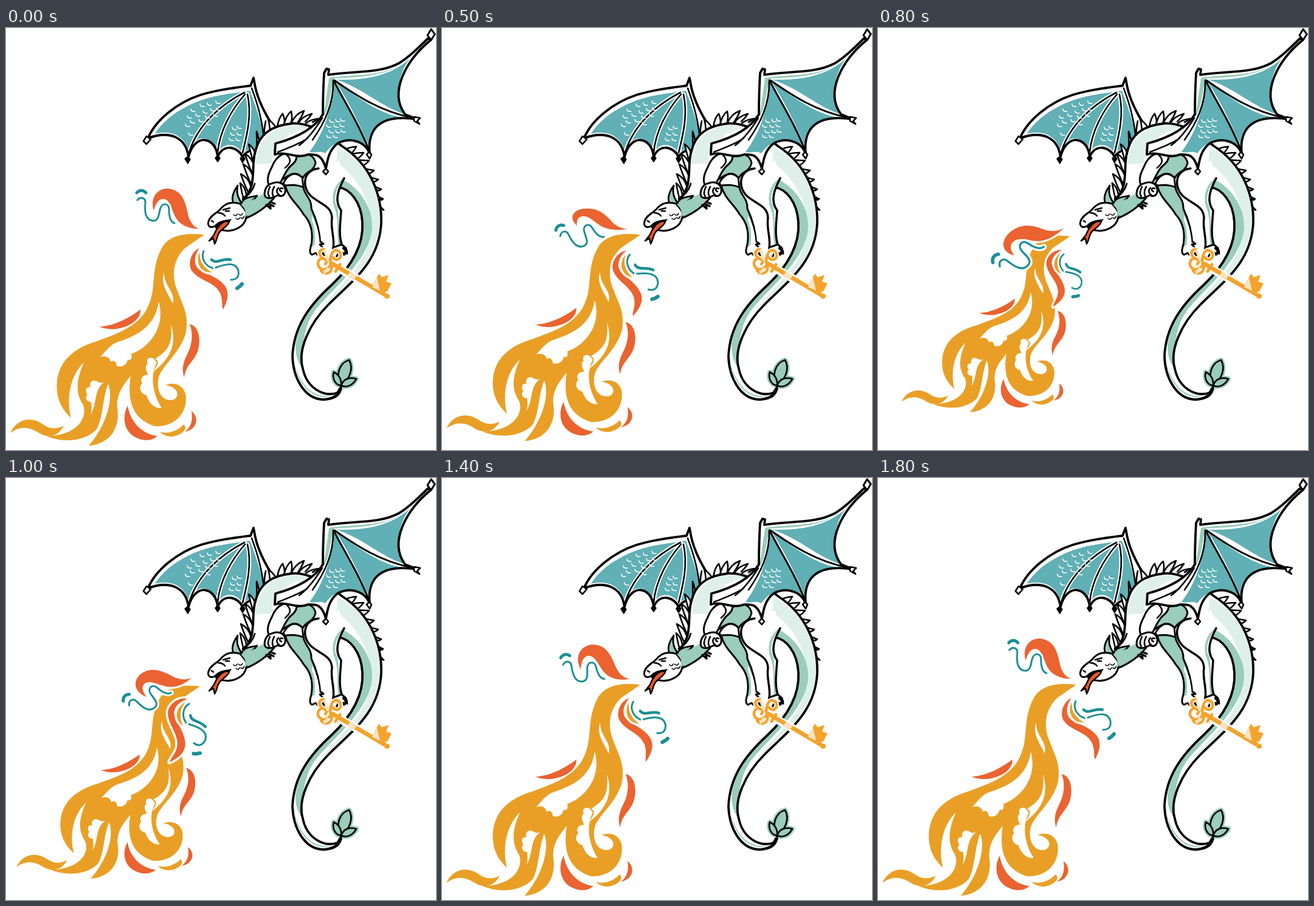
Recreate the animation shown at these times as an HTML page with a canvas. Size 707 by 694 pixels, loop 2 s.

```html
<!DOCTYPE html>
<html lang="en">
<head>
<meta charset="utf-8">
<title>Dragon breathing fire</title>
<style>
html, body { margin: 0; width: 100%; height: 100%; overflow: hidden; background: #fff; }
canvas { display: block; }
</style>
</head>
<body>
<canvas id="stage" width="707" height="694"></canvas>
<script>
const ctx = document.getElementById('stage').getContext('2d');
const BLACK = '#000', WHITE = '#fff', TEAL = '#60b0b5', MINT = '#9acdbb', PALE = '#dff0ea';
const YELLOW = '#e99f25', RED = '#ea6330', CURL = '#1b8f95', GOLD = '#f4a32c', CREAM = '#fae3c3';
ctx.lineJoin = ctx.lineCap = 'round';

function fill(d, color) {
  ctx.fillStyle = color;
  ctx.fill(new Path2D(d));
}
function line(d, width = 3, color = BLACK) {
  ctx.lineWidth = width;
  ctx.strokeStyle = color;
  ctx.stroke(new Path2D(d));
}
function shape(d, color = WHITE, width = 3) {
  fill(d, color);
  line(d, width);
}
// White margin keeps overlapping pieces apart
function haloFill(d, color) {
  line(d, 7, WHITE);
  fill(d, color);
}
function haloLine(d, width) {
  line(d, width + 6, WHITE);
  line(d, width, CURL);
}
function placed(matrix, draw) {
  ctx.save();
  ctx.transform(...matrix);
  draw();
  ctx.restore();
}
function spike(x, y, tipX, tipY, dx, dy) {
  shape(`M${x},${y} Q${x + (tipX - x) * .25},${y + (tipY - y) * .7} ${tipX},${tipY}
    Q${x + dx + (tipX - x) * .3},${y + dy + (tipY - y) * .4} ${x + dx},${y + dy}`, WHITE, 2.6);
}
function scales(points) {
  for (const [x, y] of points) line(`M${x - 3},${y - 2} q0,5 7,4`, 1.5, WHITE);
}

function flame() {
  fill(`M326,340 C296,336 268,340 256,362 C238,395 247,425 236,452 C222,492 180,503 150,515
    C105,528 80,555 84,598 C86,618 97,632 107,641 C99,610 105,572 128,550
    C115,580 114,600 127,620 C135,645 112,671 66,671 C95,683 130,680 149,660
    C160,640 158,612 168,585 C178,610 164,655 136,687 C173,684 188,655 183,625
    C181,600 195,585 205,572 L262,540 L268,380Z`, YELLOW);
  fill(`M205,572 C200,605 203,642 245,655 C285,656 300,625 295,601 C290,586 277,582 262,587
    C282,590 287,605 276,611 C258,616 246,598 251,575 C256,555 287,535 296,500
    C301,470 290,455 283,435 C268,400 275,365 326,340 L262,362 L236,470Z`, YELLOW);
  // Gaps inside the fire
  fill(`M251,450 C246,490 216,506 185,516 C171,520 164,532 155,541 C166,538 171,543 172,549
    C178,545 182,550 182,556 C192,559 199,553 200,545 C205,548 208,543 206,536
    C231,528 264,495 251,450Z`, WHITE);
  fill('M260,402 C253,421 267,437 274,453 C280,435 259,424 260,402Z', WHITE);
  fill('M271,487 C275,520 265,532 245,544 C255,549 247,556 243,565 C270,543 282,520 271,487Z', WHITE);
  fill(`M242,543 C234,540 230,546 233,552 C227,556 231,565 234,570 C223,570 220,579 224,584
    C217,592 222,602 231,604 C235,618 245,626 256,625 C242,603 236,574 248,550Z`, WHITE);
  fill(`M162,582 C153,587 150,578 143,580 C137,582 138,589 139,591 C130,589 130,598 134,603
    C128,609 134,615 140,615 C141,624 141,630 139,636 C151,617 143,596 162,582Z`, WHITE);
  // Loose pieces around it
  fill('M7,666 C18,642 42,638 61,652 C74,661 86,659 95,654 C85,674 66,675 51,664 C36,655 22,655 7,666Z', YELLOW);
  fill('M253,664 C268,669 284,661 292,652 C302,660 284,672 271,672 C262,671 256,668 253,664Z', YELLOW);
  fill('M305,630 C318,640 315,660 294,664 C306,655 307,643 305,630Z', RED);
  fill('M200,621 C190,640 194,665 215,674 C228,680 240,679 249,671 C225,668 205,650 200,621Z', RED);
  fill('M154,491 C180,490 205,475 221,463 C222,478 206,489 190,493 C176,497 162,495 154,491Z', RED);
  fill('M302,487 C318,490 321,515 315,532 C308,550 295,555 293,575 C287,555 295,544 301,530 C307,515 307,500 302,487Z', RED);
}

function upperCurls() {
  haloLine('M215,271 C219,266 226,266 230,271', 5);
  haloLine('M216,283 C222,276 230,280 229,288 C228,300 228,317 243,317 C252,316 251,304 254,296 C257,287 268,288 268,298 C268,310 270,319 277,321', 3);
}
function upperRed() {
  haloFill(`M318,330 C308,328 302,318 299,306 C295,283 288,266 266,264 C246,264 237,282 243,300
    C246,290 250,280 260,281 C272,284 272,303 282,316 C290,326 305,331 318,330Z`, RED);
}
function lowerSpray() {
  haloFill(`M318,362 C304,368 298,388 306,400 C318,416 343,417 352,436 C357,448 354,456 357,463
    C364,450 368,436 360,424 C348,408 325,404 316,396 C307,386 311,372 318,362Z`, RED);
  haloFill('M318,369 C311,386 320,403 339,402 C328,396 320,388 318,369Z', YELLOW);
  haloLine('M325,367 C320,378 327,391 340,395', 3);
  haloLine('M338,381 C346,389 356,378 369,381', 4.5);
  haloLine('M345,394 C358,389 377,383 382,399 C384,411 377,414 370,414', 3);
  haloLine('M380,428 Q385,425 388,421', 6);
}

function leftWing() {
  const bones = [
    'M392,106 C355,125 315,158 301,205',
    'M393,109 C370,135 351,170 348,205',
    'M397,109 C405,145 395,180 389,205'];
  const outline = `M234,180 C247,150 283,122 320,110 C350,101 378,98 402,95 L407,82 L410,98
    C415,120 429,146 440,163 L422,207 C410,198 396,200 389,212 C382,196 358,188 348,212
    C345,178 310,172 300,212 C296,180 270,168 234,181Z`;
  fill(outline, WHITE);
  fill(`M245,174 C264,142 310,118 350,111 C370,107 385,106 401,103 C413,135 423,164 424,184
    L417,204 C407,198 396,198 389,206 C380,190 359,186 348,205 C340,174 310,174 300,203
    C294,176 270,168 245,174Z`, TEAL);
  bones.forEach(d => line(d, 6.5, WHITE));
  bones.forEach(d => line(d, 2.6));
  line(outline, 3.8);
  line('M404,99 C413,123 422,153 424,184', 2.5);
  shape('M231,178 L238,183 L231,191 L226,186Z', WHITE, 2.6);
  ['M299,211 l-5,4 l5,8 l4,-7z', 'M348,209 l-4,5 l4,6 l4,-6z', 'M389,209 l-4,6 l4,7 l4,-7z']
    .forEach(d => shape(d, BLACK, 1.5));
  scales([[307,135], [322,127], [334,125], [348,122], [301,146], [315,143], [327,138], [339,134], [349,133],
    [306,154], [320,152], [331,146], [344,143], [298,160], [332,157], [303,174],
    [375,165], [383,163], [372,174], [383,174], [370,183], [381,183]]);
}

function rightWing() {
  const outline = `M443,190 C480,180 508,164 521,142 C521,112 522,92 523,74 L527,67 L531,68 L530,77
    C570,70 612,76 646,58 C665,47 679,31 694,17 L698,20 C658,53 629,105 656,142 L676,150
    C610,140 594,170 598,207 C590,184 563,180 545,190 C532,200 529,214 526,231
    C518,204 507,209 497,208 C477,216 463,202 442,208Z`;
  fill(outline, WHITE);
  fill('M531,82 C565,76 607,81 645,63 C610,83 565,81 540,83 C533,95 535,125 522,147Z', MINT);
  fill('M543,85 C590,86 634,79 664,50 C640,83 641,120 659,143 C616,130 588,99 543,85Z', TEAL);
  fill('M543,90 C580,114 609,139 649,147 C610,149 595,169 596,193 C578,151 560,116 543,90Z', TEAL);
  fill('M538,88 C560,129 582,160 592,192 C569,177 540,184 525,206 C516,201 509,206 499,204 C517,180 536,142 538,88Z', TEAL);
  line('M540,86 C577,112 616,137 666,147', 3);
  line('M539,87 C558,124 582,161 597,202', 3);
  line('M538,86 C539,126 523,157 504,184', 2.6);
  line(outline, 3.8);
  line('M447,204 C464,197 485,190 496,181 M482,193 Q500,180 520,148', 2.5);
  shape('M699,2 L705,10 L699,20 L693,12Z', WHITE, 3);
  shape('M671,146 L681,148 L676,153 L680,158 L671,153Z', WHITE, 2.5);
  shape('M597,204 L601,208 L598,215 L593,208Z', WHITE, 2.5);
  shape('M526,231 L530,236 L526,241 L521,236Z', WHITE, 2.5);
  scales([[535,153], [545,152], [553,151], [530,161], [542,161], [552,160],
    [534,170], [545,170], [554,169], [530,178], [541,178]]);
}

function body() {
  [[424,183,427,153], [417,196,412,170], [411,211,399,191], [408,227,393,207],
   [406,244,390,224], [402,259,386,240], [395,273,385,255]].forEach(([x, y, tx, ty]) => spike(x, y, tx, ty, -3, 12));
  [[434,170,431,150], [446,163,455,141], [457,160,469,137], [469,157,490,136],
   [481,156,503,141], [493,157,513,149]].forEach(([x, y, tx, ty]) => spike(x, y, tx, ty, 11, -2));
  [[560,199,576,195], [570,207,588,205], [580,217,597,218], [589,230,605,234], [597,243,612,249],
   [604,257,617,265], [609,272,620,281], [613,287,621,299]].forEach(([x, y, tx, ty]) => spike(x, y, tx, ty, 5, 9));
  const outline = `M390,281 C414,262 402,225 410,203 C417,172 440,160 470,157 C500,155 530,175 552,194
    C600,225 618,275 617,320 C614,385 570,415 530,455 C498,487 479,530 488,560
    C494,590 520,608 545,600 L552,588 C550,602 543,611 520,611 C490,609 472,575 471,540
    C473,490 500,455 535,423 C570,390 588,355 586,320 C584,285 565,265 548,262`;
  fill(outline + ' L515,290 L495,245 L460,255 C445,280 425,298 396,310Z', WHITE);
  fill('M411,224 C410,188 438,160 475,160 L505,162 C463,170 440,190 437,223Z', PALE);
  fill(`M545,196 C600,225 616,275 615,320 C611,382 568,414 528,453 C510,470 499,489 492,505
    C506,464 554,425 581,388 C619,328 596,258 543,220Z`, PALE);
  fill(`M548,247 C577,258 604,292 602,330 C597,382 540,426 511,461 C490,486 485,526 489,561
    C478,550 474,531 477,515 C485,475 515,443 542,418 C573,390 590,350 586,315 C583,284 565,264 548,262Z`, MINT);
  fill('M474,550 C484,588 505,609 535,605 C514,613 482,597 474,550Z', MINT);
  line(outline, 3.8);
  // Throat
  fill('M386,290 C404,291 409,276 428,272 L441,279 C426,296 411,307 393,312Z', MINT);
  line('M441,279 C428,295 411,306 394,313', 3);
  line('M389,281 C400,275 406,267 409,256', 2.8);
}

function limbs() {
  // Chest and far leg
  shape('M472,218 C482,204 505,203 509,222 C505,238 493,235 488,247 C475,231 463,244 450,252 C453,238 461,228 472,218Z', MINT);
  shape('M456,255 C463,242 474,234 487,246 L489,263 C478,257 468,258 459,260Z', WHITE, 2.8);
  shape(`M459,259 C464,280 481,291 489,306 C502,320 506,339 501,361 L517,357
    C516,335 511,316 502,297 C503,280 491,276 489,262 C478,257 468,258 459,259Z`, MINT);
  fill('M503,316 C509,330 509,346 507,361 L516,357 C515,337 511,322 503,309Z', WHITE);
  shape('M501,360 C499,367 499,371 503,373 L509,370 L513,374 L517,368 L524,374 L522,362 L516,356 L522,355 L518,352', WHITE, 3);
  // Near leg
  const leg = `M514,231 C488,234 486,261 501,276 C517,290 535,292 536,312 C533,330 541,345 538,362
    L553,359 C546,340 550,320 551,300 C540,285 545,268 556,247`;
  fill(leg + ' L548,218Z', WHITE);
  fill('M556,246 C541,265 538,283 544,292 C551,316 542,337 553,359 L547,359 C543,338 548,315 540,296 C533,274 541,256 556,246Z', MINT);
  line(leg, 3.5);
  shape('M538,361 L536,372 L542,379 L546,371 L552,377 L554,370 L561,371 L559,362 L552,356Z', WHITE, 3);
  line('M555,362 L560,367 L556,372', 4.5);
  // Near arm and hand
  shape('M474,206 C452,202 442,216 437,229 C431,240 427,252 434,260 L445,263 C456,251 457,236 469,226 C479,218 480,209 474,206Z');
  line('M462,209 C471,218 466,224 459,230', 2.6);
  shape('M433,257 C426,262 423,273 427,278 C433,282 441,278 447,275 C458,281 464,266 455,257 C447,251 440,255 433,257Z');
  line('M434,261 C430,269 430,274 433,277 M441,261 C437,268 437,275 441,278 M448,263 C443,267 446,273 450,275 M455,264 C450,262 448,267 453,269', 2.6);
  line('M428,291 L435,297 L434,290 L440,293 M437,287 L442,289', 3.5);
}

function head() {
  shape('M385,291 C391,278 400,278 413,276 C407,284 400,286 394,291Z', MINT, 2.8);
  shape('M374,288 C369,277 376,266 381,259 C378,272 382,280 388,289Z', MINT, 2.8);
  shape(`M333,318 C336,307 349,304 355,295 C362,288 372,285 385,289 C389,295 397,300 395,311
    C393,327 373,337 354,332 L349,326 L343,326 C335,330 331,325 333,318Z`);
  fill('M386,290 L409,281 C407,297 397,310 390,313 C397,301 392,296 386,290Z', MINT);
  fill('M342,326 C350,315 362,316 371,314 C366,323 358,331 349,335Z', BLACK);
  shape('M367,318 C356,316 347,327 342,340 L334,350 L341,346 L343,355 C348,348 346,338 356,331 C361,326 366,324 367,318Z', '#eb572c', 2.4);
  line('M357,299 L368,296 M361,301 L367,301 M338,317 L341,319 M349,304 Q356,304 360,309', 2.4);
  line('M374,307 q4,4 6,-1 M382,306 q5,4 7,-1 M378,313 q4,4 6,-1 M386,312 q4,3 5,-2', 1.6);
}

function tailLeaf() {
  const lobes = [
    'M551,588 C541,571 548,551 564,546 C572,560 565,578 551,588Z',
    'M551,588 C541,587 536,576 539,566 C548,570 552,579 551,588Z',
    'M551,588 C555,576 566,574 576,577 C570,588 560,592 551,588Z'];
  lobes.forEach(d => line(d, 8, MINT));
  lobes.forEach(d => shape(d, MINT, 2.7));
  line('M551,588 C550,600 542,609 523,611', 3.5);
}

function key() {
  const head = 'M535,389 C522,405 509,393 514,383 C519,374 532,382 525,388 M534,390 C531,372 540,359 549,369 C554,378 544,386 537,377 M529,382 C512,378 512,364 523,364 M535,390 C538,403 525,408 518,399';
  line('M540,391 L621,437', 14, WHITE);
  line(head, 8, WHITE);
  line(head, 4.5, GOLD);
  line('M537,388 L622,438', 7, GOLD);
  line('M549,389 L542,400', 5, GOLD);
  fill('M601,427 L613,404 L618,410 L629,406 L625,417 L634,420 L627,433 L615,437Z', GOLD);
  line('M626,441 h1', 8, GOLD);
  fill('M566,401 L577,407 L571,415 L560,408Z', CREAM);
  fill('M610,410 L615,432 L602,426Z', CREAM);
  line('M524,366 L529,381 M524,402 L529,396', 4.5, CREAM);
}

function dragon() {
  leftWing();
  body();
  limbs();
  rightWing();
  head();
  tailLeaf();
  key();
}

// flame: scale and offset; tip: root of the upper pieces; red: its linear map;
// curls: angle, scale; low: root, angle, scale of the lower spray
const poses = [
  { flame: [1, 1, 0, 0], tip: [318, 330], red: [1, 0, 0, 1], curls: [0, 1], low: [318, 363, 0, 1] },
  { flame: [1, 1, 0, 0], tip: [313, 329], red: [1.022, -.126, .126, 1.022], curls: [-7, 1], low: [310.5, 365, 0, 1] },
  { flame: [1, 1, 0, 0], tip: [309, 330], red: [1, -.195, .195, 1], curls: [-13, 1], low: [308, 363, 6.5, 1] },
  { flame: [1, .977, 0, 8], tip: [306, 330], red: [.977, -.19, .357, .645], curls: [-31, 1], low: [303, 367, 15.5, 1] },
  { flame: [.947, .911, 10.3, 33], tip: [305, 328], red: [.691, -.664, .74, .592], curls: [-49, 1], low: [298, 364, 37, 1] },
  { flame: [.869, .834, 32.8, 59], tip: [306, 328], red: [.793, -.811, .75, .495], curls: [-56, 1.1], low: [302, 366, 30, .87] }
];
const starts = [0, 200, 400, 500, 600, 800, 1000, 1200, 1400, 1600, 1800];

// Linear map that sends one pivot to another
function about([a, b, c, d], [px, py], [x, y]) {
  return [a, b, c, d, x - a * px - c * py, y - b * px - d * py];
}
function turn(degrees, scale) {
  const r = degrees * Math.PI / 180, c = Math.cos(r) * scale, s = Math.sin(r) * scale;
  return [c, s, -s, c];
}

function frame(now) {
  const t = now % 2000;
  const step = starts.findLastIndex(start => start <= t);
  const { flame: [sx, sy, tx, ty], tip, red, curls, low: [x, y, angle, scale] } = poses[Math.min(step, 10 - step)];
  ctx.fillStyle = WHITE;
  ctx.fillRect(0, 0, 707, 694);
  placed([sx, 0, 0, sy, tx, ty], flame);
  placed(about(red, [318, 330], tip), upperRed);
  placed(about(turn(...curls), [318, 330], tip), upperCurls);
  placed(about(turn(angle, scale), [318, 363], [x, y]), lowerSpray);
  dragon();
  requestAnimationFrame(() => frame(performance.now() - origin));
}
const origin = performance.now();
frame(0);
</script>
</body>
</html>
```
